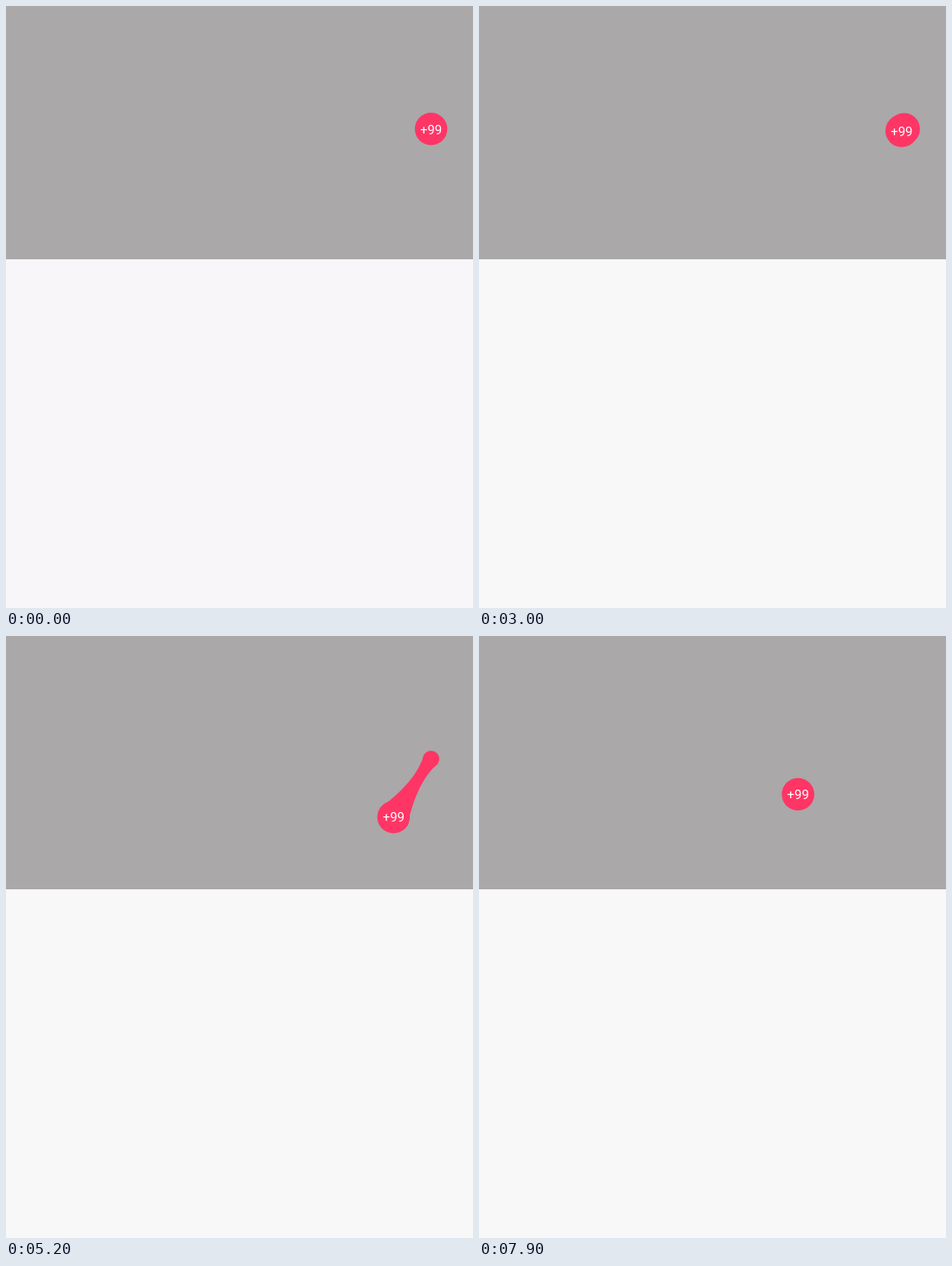
Recreate the animation shown at these times as an HTML page with a canvas. Size 539 px wide and 694 px high, loop 8000 ms.

```html
<!DOCTYPE html>
<html lang="en">
<head>
<meta charset="utf-8">
<title>Sticky badge</title>
<style>
  html, body { margin: 0; width: 100%; height: 100%; overflow: hidden; background: #f8f8f8; }
  canvas { display: block; }
</style>
</head>
<body>
<canvas id="stage" width="539" height="694"></canvas>
<script>
const ctx = document.getElementById('stage').getContext('2d');
const LOOP = 8000, STEP = 100;
const RADIUS = 18.75, SHRINK = 0.1155, SNAP = 100, WAIST = 0.618;

const point = (x, y) => ({ x, y });
const HOME = point(490.6, 141.8);
const RELEASED = point(455.3, 199);
const PULLED = point(440.6, 180);
const RESTING = point(401.3, 178.8);
const FINAL = point(368.2, 182.5);

const clamp = u => Math.min(Math.max(u, 0), 1);
const mix = (a, b, u) => a + (b - a) * u;
const between = (p, q, u) => point(mix(p.x, q.x, u), mix(p.y, q.y, u));
const smooth = u => u * u * (3 - 2 * u);
const progress = (time, start, end) => clamp((time - start) / (end - start));
const distance = p => Math.hypot(p.x - HOME.x, p.y - HOME.y);
const anchorRadius = d => RADIUS - d * SHRINK;

function overshoot(u, tension = 3) {
  const t = u - 1;
  return 1 + t * t * ((tension + 1) * t + tension);
}

// Clockwise tilted oval that widens as it starts
function orbit(time) {
  const elapsed = time - 3750;
  const angle = (-239 + 0.23 * elapsed) * Math.PI / 180;
  const size = mix(0.715, 1, clamp(elapsed / 250));
  return point(
    467 + 49.5 * size * Math.cos(angle + 0.33),
    133.5 + 75.5 * size * Math.sin(angle)
  );
}

function catmull(a, b, c, d, u) {
  return b + u / 2 * (c - a + u * (2 * a - 5 * b + 4 * c - d + u * (3 * (b - c) + d - a)));
}

// Small hook past the anchor, then out to the resting place
const hook = [
  orbit(5400), orbit(5600), point(473, 112), point(437.8, 152),
  point(411, 171), RESTING, RESTING
];

function followHook(time) {
  const position = (time - 5600) / 200, i = Math.floor(position);
  const [a, b, c, d] = hook.slice(i, i + 4);
  const axis = n => catmull(a[n], b[n], c[n], d[n], position - i);
  return point(axis('x'), axis('y'));
}

function pose(time) {
  if (time < 2110) return between(HOME, RELEASED, smooth(progress(time, 900, 2110)));
  if (time < 2900) return between(RELEASED, HOME, overshoot(progress(time, 2110, 2610)));
  if (time < 3750) return between(HOME, PULLED, smooth(progress(time, 2900, 3600)));
  if (time < 5600) return orbit(time);
  if (time < 6400) return followHook(time);
  return between(RESTING, FINAL, progress(time, 6600, 7900) ** 1.3);
}

function disc(p, r) {
  ctx.beginPath();
  ctx.arc(p.x, p.y, r, 0, Math.PI * 2);
  ctx.fill();
}

function neck(badge, r, d) {
  const nx = (badge.y - HOME.y) / d, ny = (HOME.x - badge.x) / d;
  const waist = between(badge, HOME, WAIST);
  ctx.beginPath();
  ctx.moveTo(HOME.x + nx * r, HOME.y + ny * r);
  ctx.quadraticCurveTo(waist.x, waist.y, badge.x + nx * RADIUS, badge.y + ny * RADIUS);
  ctx.lineTo(badge.x - nx * RADIUS, badge.y - ny * RADIUS);
  ctx.quadraticCurveTo(waist.x, waist.y, HOME.x - nx * r, HOME.y - ny * r);
  ctx.fill();
}

function draw(time) {
  ctx.fillStyle = time < 1000 ? '#f8f6f9' : '#f8f8f8';
  ctx.fillRect(0, 0, 539, 694);
  ctx.fillStyle = '#aaa8a8';
  ctx.fillRect(0, 0, 539, 292);

  const badge = pose(time), d = distance(badge);
  const springing = time >= 2110 && time < 2610;
  ctx.fillStyle = '#ff3565';
  if (d > 0.1 && d < SNAP) {
    const r = anchorRadius(springing ? distance(RELEASED) : d);
    disc(HOME, r);
    neck(badge, r, d);
  }
  disc(badge, RADIUS);

  ctx.fillStyle = '#fff';
  ctx.font = '15px Roboto, sans-serif';
  ctx.textAlign = 'center';
  ctx.fillText('+99', badge.x, badge.y + 5.7);
}

function tick() {
  const time = performance.now() % LOOP;
  draw(Math.floor(time / STEP) * STEP);
  requestAnimationFrame(tick);
}
tick();
</script>
</body>
</html>
```
